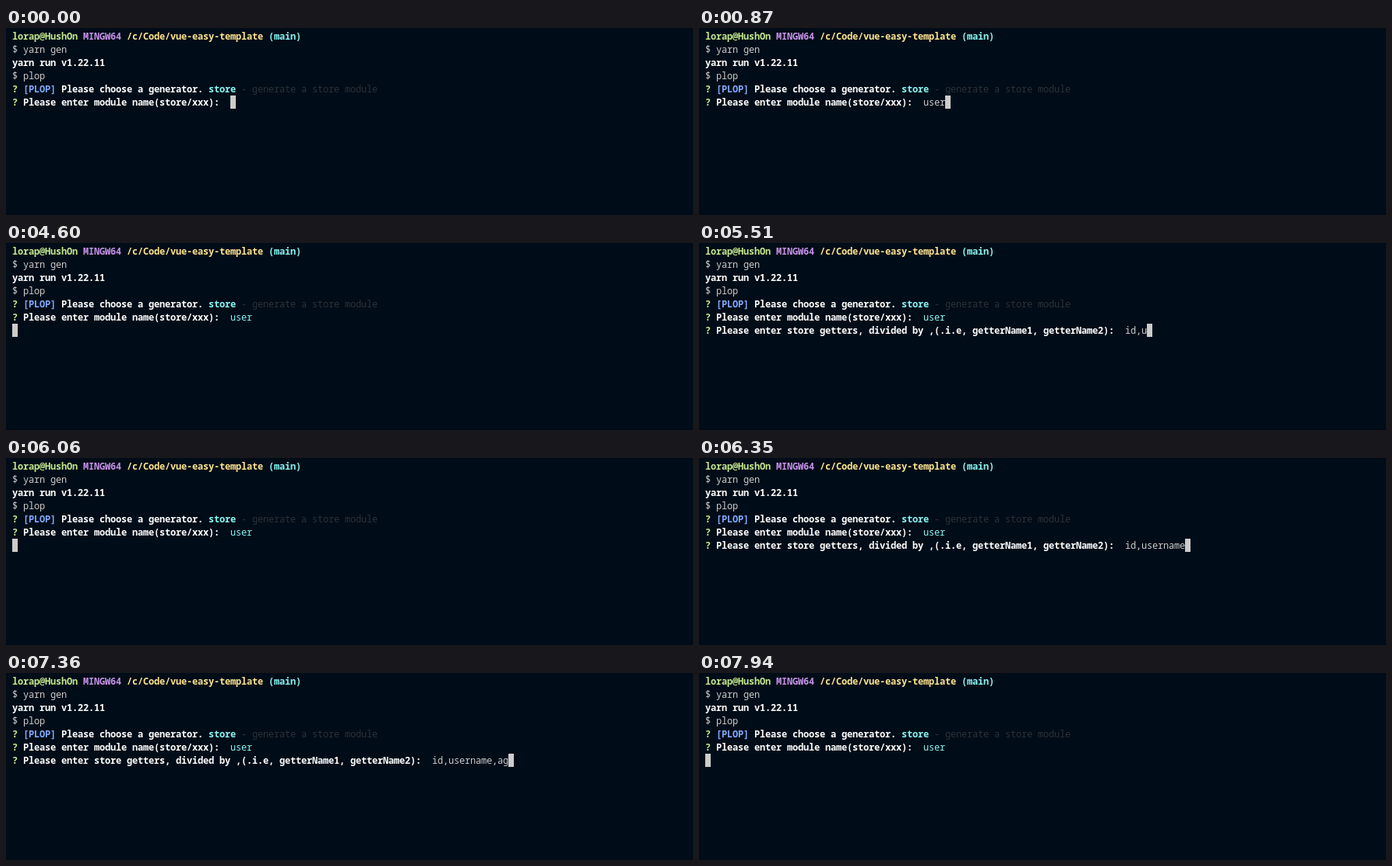
These frames come from a looping animation (882 px wide and 241 px high, 8 s). An HTML page:

```html
<!DOCTYPE html>
<html lang="en">
<head>
<meta charset="utf-8">
<title>Terminal generator</title>
<style>
  html, body { margin: 0; width: 100%; height: 100%; overflow: hidden; background: #000c17; }
  .term {
    --cell: 7px;
    position: absolute; left: 8px; top: 2px;
    font: 12px/17px "Noto Sans Mono", "DejaVu Sans Mono", monospace;
    letter-spacing: -0.2px;
    font-variant-ligatures: none;
    color: #ccc;
  }
  .row { height: 17px; position: relative; white-space: pre; }
  b { color: #fff; font-weight: 700; }
  .green, .violet, .yellow, .cyan, .blue { font-weight: 600; }
  .green { color: #c3e88d; }
  .violet { color: #c792ea; }
  .yellow { color: #ffe58f; }
  .cyan { color: #89f7f5; }
  .blue { color: #82aaff; }
  .dim { color: #2b3138; }

  .typed {
    position: absolute; top: 0; left: calc(var(--col) * var(--cell));
    width: calc(var(--n) * var(--cell)); height: 17px; overflow: hidden;
  }
  .cursor {
    position: absolute; width: 7px; height: 17px; background: #ccc;
    left: calc(var(--x) * var(--cell)); top: calc(var(--y) * 17px);
  }
  .typed, .cursor, .getters { animation: 8s step-end infinite; }
  .module { --col: 40; animation-name: module; }
  .list { --col: 77; animation-name: list; }
  .getters { animation-name: getters; }
  .cursor { animation-name: cursor; }

  @keyframes module {
    0% { --n: 0; color: #ccc; }
    5.375% { --n: 1; color: #ccc; }
    9% { --n: 2; color: #ccc; }
    10.875% { --n: 4; color: #ccc; }
    17.75%, 100% { --n: 4; color: #89f7f5; }
  }
  @keyframes list {
    0% { --n: 0; }
    59.375% { --n: 2; }
    61.25% { --n: 3; }
    68.875% { --n: 4; }
    70.375% { --n: 6; }
    72.25% { --n: 7; }
    77.5% { --n: 10; }
    79.375% { --n: 11; }
    81.5% { --n: 12; }
    88.5% { --n: 13; }
    92% { --n: 14; }
    93.5%, 100% { --n: 15; }
  }
  /* The prompt line is briefly cleared on redraw */
  @keyframes getters {
    0%, 57.5%, 75.75%, 90.125%, 99.25%, 100% { opacity: 0; }
    17.75%, 59.375%, 77.5%, 92% { opacity: 1; }
  }
  @keyframes cursor {
    0% { --x: 40; --y: 5; }
    5.375% { --x: 41; --y: 5; }
    9% { --x: 42; --y: 5; }
    10.875% { --x: 44; --y: 5; }
    17.75% { --x: 77; --y: 6; }
    57.5%, 75.75%, 90.125%, 99.25%, 100% { --x: 0; --y: 6; }
    59.375% { --x: 79; --y: 6; }
    61.25% { --x: 80; --y: 6; }
    68.875% { --x: 81; --y: 6; }
    70.375% { --x: 83; --y: 6; }
    72.25% { --x: 84; --y: 6; }
    77.5% { --x: 87; --y: 6; }
    79.375% { --x: 88; --y: 6; }
    81.5% { --x: 89; --y: 6; }
    88.5% { --x: 90; --y: 6; }
    92% { --x: 91; --y: 6; }
    93.5% { --x: 92; --y: 6; }
  }
</style>
</head>
<body>
<div class="term">
  <div class="row"><span class="green">lorap@HushOn</span> <span class="violet">MINGW64</span> <span class="yellow">/c/Code/vue-easy-template</span> <span class="cyan">(main)</span></div>
  <div class="row">$ yarn gen</div>
  <div class="row"><b>yarn run v1.22.11</b></div>
  <div class="row">$ plop</div>
  <div class="row"><span class="green">?</span> <span class="blue">[PLOP]</span> <b>Please choose a generator.</b> <span class="cyan">store</span><span class="dim"> - generate a store module</span></div>
  <div class="row"><span class="green">?</span> <b>Please enter module name(store/xxx):</b><span class="typed module">user</span></div>
  <div class="row getters"><span class="green">?</span> <b>Please enter store getters, divided by ,(.i.e, getterName1, getterName2):</b><span class="typed list">id,username,age</span></div>
  <div class="cursor"></div>
</div>
</body>
</html>
```
